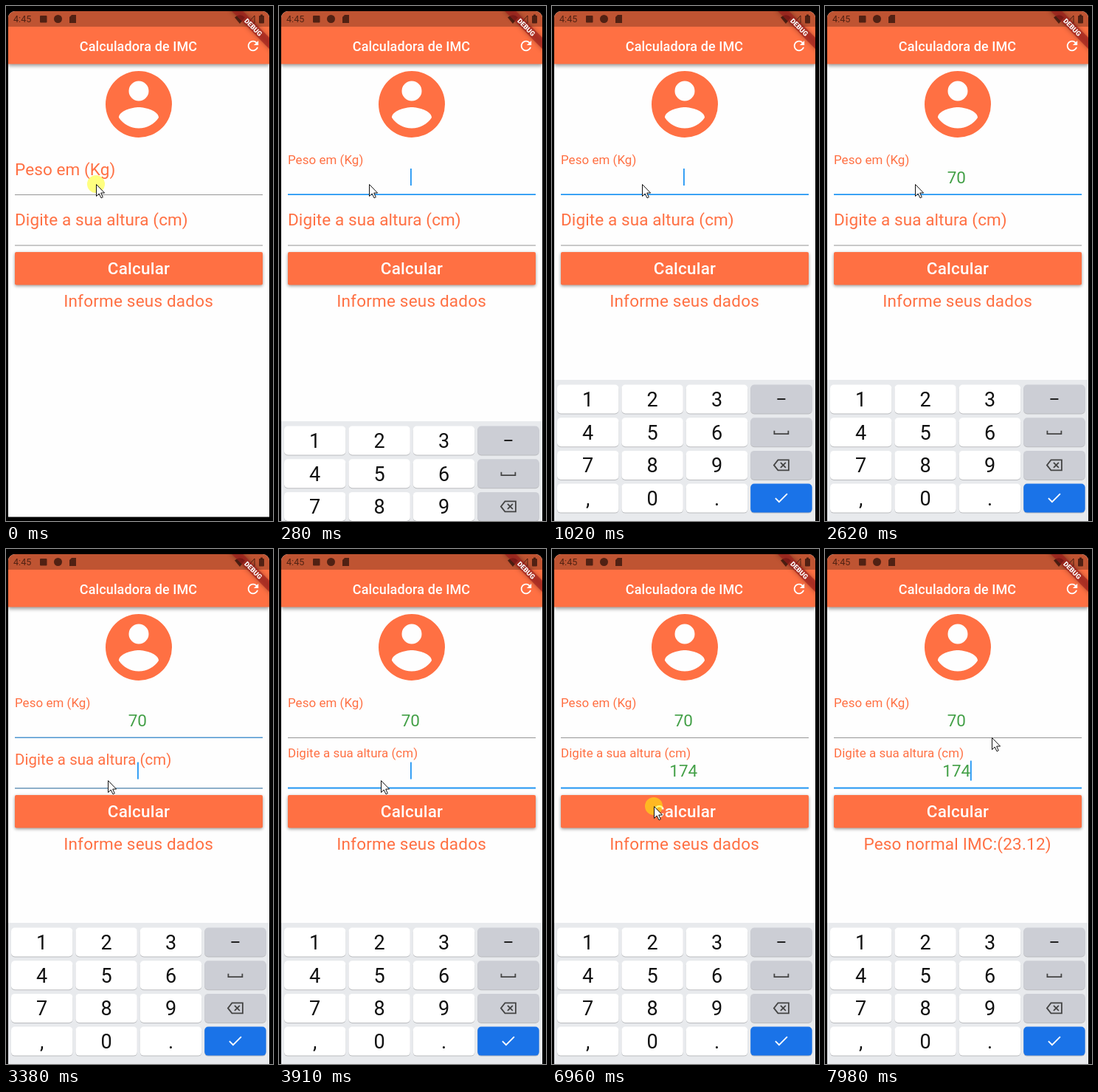
Animation of 362x697 px, one loop 8000 ms. Source, as an HTML page with a canvas:

```html
<!DOCTYPE html>
<html lang="pt">
<head>
<meta charset="utf-8">
<title>Calculadora de IMC</title>
<style>
  html, body { margin: 0; width: 100%; height: 100%; overflow: hidden; background: #000; }
  canvas { display: block; }
</style>
</head>
<body>
<canvas id="stage" width="362" height="697"></canvas>
<script>
const ctx = document.getElementById('stage').getContext('2d');
const LOOP = 8000;
const ORANGE = '#ff7043', BLUE = '#2196f3', GREEN = '#43a047', DIM = 'rgba(30,10,5,.68)';
const FIELD_GAP = 68.4;

const ICONS = {
  avatar: new Path2D('M12 2a10 10 0 1 0 0 20a10 10 0 1 0 0-20zM12 5a3 3 0 1 1 0 6a3 3 0 1 1 0-6zM12 19.2c-2.5 0-4.71-1.28-6-3.22.03-1.99 4-3.08 6-3.08 1.99 0 5.97 1.09 6 3.08-1.29 1.94-3.5 3.22-6 3.22z'),
  refresh: new Path2D('M17.65 6.35C16.2 4.9 14.21 4 12 4c-4.42 0-7.99 3.58-7.99 8s3.57 8 7.99 8c3.73 0 6.84-2.55 7.73-6h-2.08c-.82 2.33-3.04 4-5.65 4-3.31 0-6-2.69-6-6s2.69-6 6-6c1.66 0 3.14.69 4.22 1.78L13 11h7V4z'),
  arrow: new Path2D('M.5 .5V16.5L4.2 13L7 18.8L9.3 17.7L6.7 12H11.6z'),
  wifi: new Path2D('M0 3.5Q7 -3 14 3.5L7 12z'),
  card: new Path2D('M3 0H9V11H0V3z'),
  backspace: new Path2D('M-4.5 -7H10V7H-4.5L-10 0zM-1 -3.5L6 3.5M6 -3.5L-1 3.5')
};

// Caret visibility flips at each of these times.
const CARET = [30, 520, 1020, 2210, 2710, 3210, 3320, 3680, 3910, 5140, 5260, 5760, 6240, 6730, 7230];
const PRESSES = [[0, 30], [3200, 3320], [6960, 7080]];
const MOVES = [
  { from: 2620, to: 3050, x: 138, y: 313 },
  { from: 6090, to: 6370, x: 138, y: 348 },
  { from: 7750, to: 7980, x: 226, y: 255 }
];
const WEIGHT = [[1350, '7'], [1700, '70']];
const HEIGHT = [[4290, '1'], [4650, '17'], [5260, '174']];

const ramp = (t, a, b) => Math.min(1, Math.max(0, (t - a) / (b - a)));
const mix = (a, b, p) => a + (b - a) * p;
const smooth = p => p * p * (3 - 2 * p);
const typed = (steps, t) => steps.reduce((value, [at, s]) => t >= at ? s : value, '');

// cubic-bezier(.4, 0, .2, 1)
function fastOutSlowIn(x) {
  let lo = 0, hi = 1;
  for (let i = 0; i < 16; i++) {
    const u = (lo + hi) / 2, v = 1 - u;
    if (1.2 * v * v * u + .6 * v * u * u + u * u * u < x) lo = u; else hi = u;
  }
  return lo * lo * (3 - 2 * lo);
}

function text(str, x, y, size, color, { align = 'left', weight = 400, spacing = 0 } = {}) {
  ctx.font = `${weight} ${size}px Roboto, sans-serif`;
  ctx.letterSpacing = spacing + 'px';
  ctx.textAlign = align;
  ctx.fillStyle = color;
  ctx.fillText(str, x, y);
}

function rect(x, y, w, h, color, radius = 0) {
  ctx.fillStyle = color;
  ctx.beginPath();
  ctx.roundRect(x, y, w, h, radius);
  ctx.fill();
}

function circle(x, y, r, color) {
  ctx.fillStyle = color;
  ctx.beginPath();
  ctx.arc(x, y, r, 0, 7);
  ctx.fill();
}

function line(points, color, width) {
  ctx.strokeStyle = color;
  ctx.lineWidth = width;
  ctx.beginPath();
  points.forEach(([x, y]) => ctx.lineTo(x, y));
  ctx.stroke();
}

function at(x, y, scale, draw) {
  ctx.save();
  ctx.translate(x, y);
  ctx.scale(scale, scale);
  draw();
  ctx.restore();
}

function icon(path, x, y, scale, color) {
  at(x, y, scale, () => {
    ctx.fillStyle = color;
    ctx.fill(path, 'evenodd');
  });
}

function shadowed(blur, dy, alpha, draw) {
  ctx.save();
  ctx.shadowColor = `rgba(0,0,0,${alpha})`;
  ctx.shadowBlur = blur;
  ctx.shadowOffsetY = dy;
  draw();
  ctx.restore();
}

function drawBars() {
  shadowed(5, 2, .4, () => rect(3, 28, 354, 50.5, ORANGE));
  rect(3, 7, 354, 21, '#bf5432');
  text('4:45', 10, 22, 12.6, DIM);
  rect(46, 13, 9.5, 9.5, DIM, 1);
  circle(70.5, 17.5, 5.5, DIM);
  icon(ICONS.card, 86, 12, 1, DIM);
  icon(ICONS.wifi, 310, 12, 1, DIM);
  line([[328, 23], [337, 23], [337, 13], [328, 23]], DIM, 1);
  rect(343, 13, 7, 10.5, DIM, 1);
  rect(345, 11.5, 3, 2, DIM);
  text('Calculadora de IMC', 179.5, 61, 18, '#fff', { align: 'center', weight: 500, spacing: .1 });
  icon(ICONS.refresh, 324.2, 43.2, .9, '#fff');
}

function drawBanner() {
  ctx.save();
  ctx.translate(357, 7);
  ctx.rotate(Math.PI / 4);
  shadowed(6, 0, .5, () => rect(-40, 25.2, 80, 10.8, 'rgba(160,28,28,.63)'));
  text('DEBUG', 0, 34, 9.2, '#fff', { align: 'center', weight: 900 });
  ctx.restore();
}

function drawField(label, dy, floated, focus, value, caret) {
  ctx.save();
  ctx.translate(0, dy);
  at(12, mix(229, 214, floated), mix(1, .75, floated), () =>
    text(label, 0, 0, 22.5, ORANGE, { spacing: .1 }));
  text(value, 178.3, 239.5, 22.5, GREEN, { align: 'center' });
  if (caret) {
    const x = 178 + ctx.measureText(value).width / 2;
    rect(x, value ? 218 : 220, 1.8, value ? 27 : 23, BLUE);
  }
  const [r, g, b] = [[150, 33], [150, 150], [150, 243]].map(([off, on]) => mix(off, on, focus));
  rect(12, 255 - focus * .8, 336, 1 + focus * .9, `rgb(${r},${g},${b})`);
  ctx.restore();
}

function drawButton(t) {
  const fade = ramp(t, 6960, 7040) * (1 - ramp(t, 7100, 7290));
  shadowed(4 + fade * 4, 1.5 + fade * 2, .4, () => rect(12, 333, 336, 44.5, ORANGE, 2));
  if (fade > 0) {
    ctx.save();
    ctx.beginPath();
    ctx.rect(12, 333, 336, 44.5);
    ctx.clip();
    rect(12, 333, 336, 45, `rgba(188,188,188,${fade * .2})`);
    circle(138, 348, 230 * ramp(t, 6960, 7260), `rgba(200,200,200,${fade * .25})`);
    ctx.restore();
  }
  text('Calcular', 180, 363, 22.5, '#fff', { align: 'center', weight: 500, spacing: .2 });
}

function drawKeyboard(top) {
  rect(3, top, 354, 697 - top, '#e8eaed');
  ['123-', '456_', '789<', ',0.>'].forEach((row, r) => [...row].forEach((key, c) => {
    const x = 7 + c * 87.4, y = top + 6.5 + r * 44.7, cx = x + 41.7, cy = y + 19.5;
    const color = c < 3 ? '#fff' : r < 3 ? '#ccced5' : '#1a73e8';
    rect(x, y + 1, 83.4, 39, 'rgba(0,0,0,.2)', 5);
    rect(x, y, 83.4, 39, color, 5);
    if (c < 3) text(key, cx, cy + 10, 27, '#111', { align: 'center' });
    else if (r === 0) line([[cx - 5.5, cy], [cx + 5.5, cy]], '#222', 2);
    else if (r === 1) line([[cx - 9.5, cy - 2], [cx - 9.5, cy + 2.5], [cx + 9.5, cy + 2.5], [cx + 9.5, cy - 2]], '#444', 1.8);
    else if (r === 2) at(cx, cy, 1, () => {
      ctx.strokeStyle = '#444';
      ctx.lineWidth = 1.8;
      ctx.stroke(ICONS.backspace);
    });
    else line([[cx - 8, cy], [cx - 3, cy + 5], [cx + 8, cy - 6]], '#fff', 1.9);
  }));
}

function drawPointer(t) {
  let x = 122, y = 241;
  for (const move of MOVES) {
    const p = smooth(ramp(t, move.from, move.to));
    x = mix(x, move.x, p);
    y = mix(y, move.y, p);
  }
  if (PRESSES.some(([a, b]) => t >= a && t < b)) circle(x, y, 12, 'rgba(255,255,0,.5)');
  at(x, y, 1, () => {
    ctx.fillStyle = '#fff';
    ctx.fill(ICONS.arrow);
    ctx.strokeStyle = '#111';
    ctx.lineWidth = 1;
    ctx.stroke(ICONS.arrow);
  });
}

function draw(t) {
  const first = fastOutSlowIn(ramp(t, 30, 230));
  const second = fastOutSlowIn(ramp(t, 3320, 3520));
  const caret = CARET.filter(time => t >= time).length % 2 === 1;
  const onSecond = t >= 3320;

  rect(0, 0, 362, 697, '#000');
  ctx.save();
  ctx.beginPath();
  ctx.roundRect(3, 7, 354, 700, [9, 9, 0, 0]);
  ctx.clip();
  rect(3, 7, 354, 684.5, '#fefefe');
  drawBars();
  icon(ICONS.avatar, 126, 79, 4.5, ORANGE);
  drawField('Peso em (Kg)', 0, first, first - second, typed(WEIGHT, t), caret && !onSecond);
  drawField('Digite a sua altura (cm)', FIELD_GAP, second, second, typed(HEIGHT, t), caret && onSecond);
  drawButton(t);
  text(t < 7080 ? 'Informe seus dados' : 'Peso normal IMC:(23.12)', 179.6, 407, 22.5, ORANGE,
    { align: 'center', spacing: .2 });
  if (t >= 140) drawKeyboard(506 + 191 * (1 - ramp(t, 140, 560)) ** 3);
  drawBanner();
  ctx.restore();
  drawPointer(t);
}

function tick() {
  draw(performance.now() % LOOP);
  requestAnimationFrame(tick);
}
tick();
</script>
</body>
</html>
```
